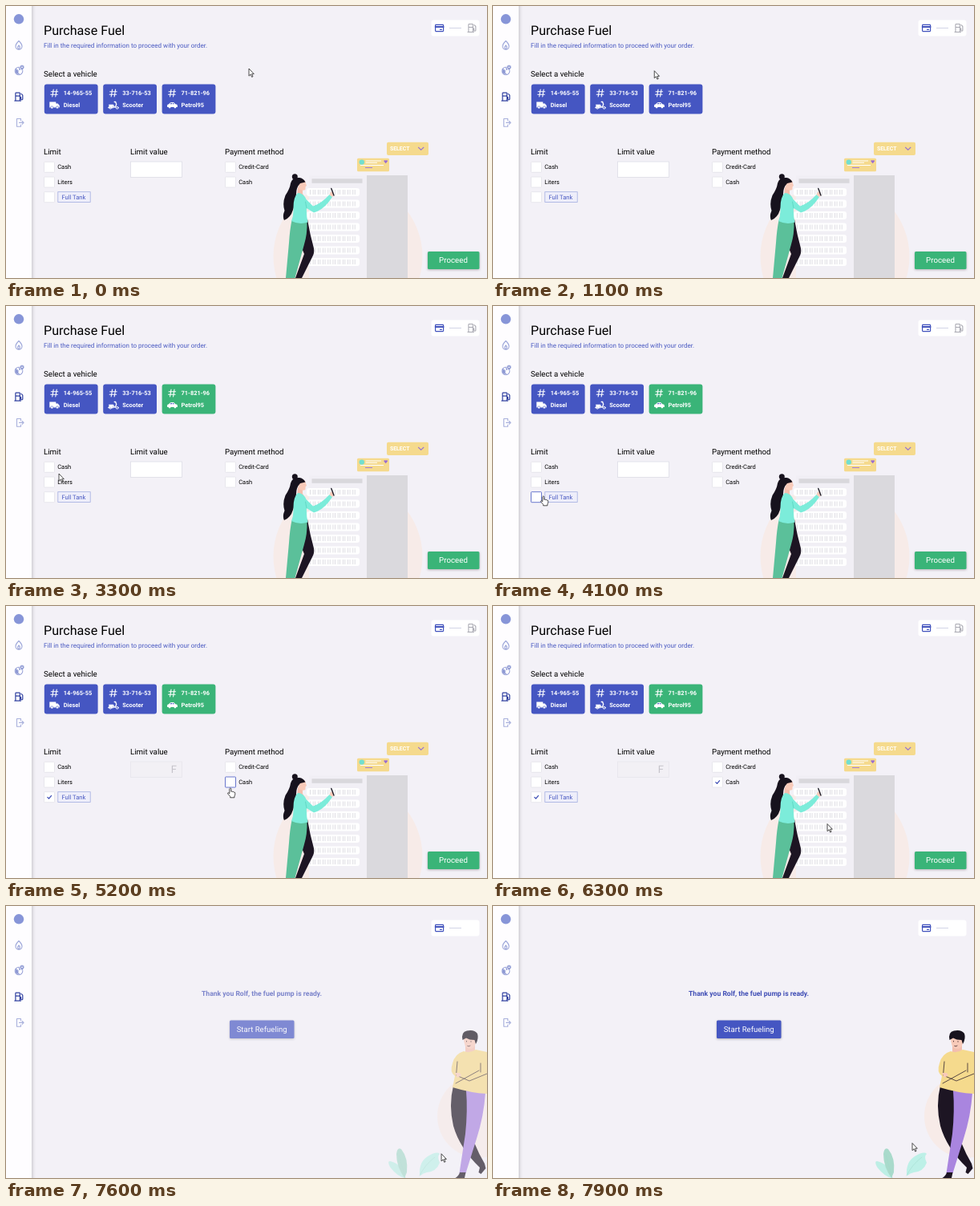
These frames come from a looping animation (600 by 339 pixels, 8 s). An HTML page:

```html
<!DOCTYPE html>
<html lang="en">
<head>
<meta charset="utf-8">
<title>Purchase Fuel</title>
<style>
  html, body { margin: 0; width: 100%; height: 100%; overflow: hidden; background: #f3f1f7; }
  svg { display: block; width: 100%; height: 100%; font-family: Roboto, sans-serif; text-rendering: geometricPrecision; }
  .head { font-size: 9.7px; fill: #000; }
  .label { font-size: 7.5px; fill: #000; }
  .plate { font-size: 7.4px; font-weight: 700; fill: #fff; }
  .line { fill: none; stroke-linecap: round; stroke-linejoin: round; }
  .soft { filter: drop-shadow(0 1px 1.5px #0004); }
</style>
</head>
<body>
<svg viewBox="0 0 600 339">
  <defs>
    <g id="pump" class="line">
      <path d="M1.5 10.5V1.2Q1.5.5 2.2.5H6.3Q7 .5 7 1.2V10.5M.5 10.5H8M1.5 4.5H7M7 6H8.2V8.5Q9.3 9.8 10.4 8.5V3.5L8.6 1.7"/>
    </g>
    <g id="hash" class="line" stroke="#fff" stroke-width="1.1">
      <path d="M3.4 0L2 9M7.4 0L6 9M.5 2.7H9M0 6.3H8.5"/>
    </g>
    <g id="truck">
      <path d="M0 0H8V2H10.3L12.5 4.5V7H0Z" fill="#fff"/>
      <g fill="#fff" stroke="#4556c2" stroke-width=".6"><circle cx="3" cy="7" r="1.6"/><circle cx="9.7" cy="7" r="1.6"/></g>
    </g>
    <g id="scooter" class="line" stroke="#fff">
      <path d="M1 4H6L7 6.5H8.7L10 3 9 0H7.5" stroke-width="1.3"/>
      <path d="M0 7Q1 4 4.5 4L6 7Z" fill="#fff"/>
      <circle cx="2.6" cy="7.3" r="1.4"/><circle cx="11" cy="7.3" r="1.4"/>
    </g>
    <g id="car">
      <path d="M0 6.4V4Q.5 3 2 2.8L4 .8Q5 .4 8 .6L10.2 2.8Q12.8 3 12.8 4.5V6.4Z" fill="#fff"/>
      <path d="M3.4 2.8L4.6 1.6H6V2.8ZM6.8 2.8V1.6H7.8L8.8 2.8Z" fill="#4556c2"/>
      <circle cx="3" cy="6.6" r="1.4" fill="#fff"/><circle cx="9.8" cy="6.6" r="1.4" fill="#fff"/>
    </g>
  </defs>

  <rect width="600" height="339" fill="#f3f1f7"/>

  <!-- Sidebar -->
  <rect x="-5" y="-5" width="37" height="349" fill="#fefdff" style="filter:drop-shadow(1px 0 2px #0003)"/>
  <circle cx="16" cy="16.3" r="6.2" fill="#8795d8"/>
  <g class="line" stroke="#9aa4d8" stroke-width="1.1">
    <path d="M16 43.5Q20 47.5 20 50.2A4 4 0 0 1 12 50.2Q12 47.5 16 43.5ZM16 49Q18 51 17 52.8Q16 54 15 52.8Q14 51 16 49Z"/>
    <circle cx="16" cy="81" r="4.8"/>
    <path d="M12.2 78.5L15 80.5 14.5 83 16.5 85M16 76.5L17.5 79"/>
    <path d="M18.5 140.5H13.5V150.3H18.5V148M18.5 140.5V142.8M16.5 145.4H22M20.2 143.5L22.1 145.4 20.2 147.3" stroke="#a9b1dc"/>
  </g>
  <path d="M12 79L15.5 81 14.5 85.3 12 83ZM16 77L18 79.5 16.5 80Z" fill="#8f9ad4"/>
  <path d="M20 80.5Q17.2 77.5 17.2 76.3A2.8 2.8 0 0 1 22.8 76.3Q22.8 77.5 20 80.5Z" fill="#8f9ad4" stroke="#fff" stroke-width=".5"/>
  <circle cx="20" cy="76.3" r=".9" fill="#fff"/>
  <use href="#pump" x="10.4" y="107.7" stroke="#3040a0" stroke-width="1.2"/>

  <!-- Progress -->
  <rect x="530.5" y="17.5" width="60" height="20" rx="3" fill="#fff"/>
  <g class="line" stroke="#4152bd" stroke-width="1.2">
    <rect x="535.6" y="23.4" width="10" height="8.2" rx=".8"/>
    <path d="M535.6 26H545.6" stroke-width="1.8"/><path d="M541.5 29.3H543.5"/>
  </g>
  <path d="M553 27.5H568" stroke="#c7cae0" stroke-width=".8"/>

  <!-- Order form -->
  <g id="form">
    <use href="#pump" x="575.5" y="22" stroke="#a9a9b2" stroke-width="1.1"/>
    <text x="47" y="36" font-size="16.1">Purchase Fuel</text>
    <text x="47" y="52.2" font-size="8.05" fill="#4a5ac2">Fill in the required information to proceed with your order.</text>
    <g class="head">
      <text x="47" y="87.5">Select a vehicle</text>
      <text x="47" y="184.5">Limit</text>
      <text x="155" y="184.5">Limit value</text>
      <text x="273" y="184.5">Payment method</text>
    </g>
    <g id="cards"></g>

    <!-- Server cabinet -->
    <circle cx="426.5" cy="312" r="93" fill="#f7ebe8"/>
    <rect x="378" y="211" width="72" height="128" fill="#f1eff5"/>
    <rect x="450" y="211" width="51" height="128" fill="#dad9dd"/>
    <rect x="381.5" y="215.3" width="63" height="5.5" fill="#d9d8dc"/>
    <g id="racks"></g>
    <rect x="475" y="169.7" width="52" height="16.3" rx="2" fill="#f5da8d"/>
    <text x="479" y="180.2" font-size="6.9" font-weight="700" fill="#fff">SELECT</text>
    <path class="line" d="M514.5 176.3L517.7 179.4 520.9 176.3" stroke="#9a78cf" stroke-width="1.2"/>
    <rect x="438" y="189.7" width="40" height="16.5" rx="1.5" fill="#f5da8d"/>
    <circle cx="443.8" cy="194.6" r="3.2" fill="#72dfcf"/>
    <path d="M448.5 193H468M448.5 195.3H463M442 198.5H471" stroke="#fff" stroke-width="1"/>
    <path d="M448 201.5H457" stroke="#a57ad0" stroke-width="1"/>
    <path d="M473.7 196.2L471.4 193.6Q471.2 191.4 473.7 192.6Q476.2 191.4 476 193.6Z" fill="#9a6bd0"/>

    <!-- Woman -->
    <path d="M364 268L376 266Q379 284 384 302Q385 308 382 313L369 339H361L372 309 364 290Z" fill="#1d1523"/>
    <path d="M356.5 267L375.5 269Q376 284 372 297L360.5 339H349L353 295Q354 279 356.5 267Z" fill="#5bc09a"/>
    <path d="M364 226H370V234L372 237 363 238Z" fill="#f3bfae"/>
    <path d="M364.5 217.5Q373 214 374 221L375 224 373.7 225 373.3 229Q370 231 365 228Z" fill="#f8cab9"/>
    <circle cx="360.3" cy="212.8" r="3.5" fill="#17121d"/>
    <path d="M373.5 219.5Q371 214.5 366 214Q357 213 355 221Q354 228 348.5 236Q344.5 246 347.5 255Q344.5 262 347 267Q355 264 358 254Q362 243 362 234Q362 226 367 221Z" fill="#17121d"/>
    <path d="M364 233Q371 233 374.5 241L383 249.5Q393 246.5 403.5 235L407 238Q397 254 384 257.5L375 252Q374.5 261 376.5 269.5Q366 273 356 268Q359 261 358.5 251Q358.5 238 364 233Z" fill="#7cecda"/>
    <path class="line" d="M373.5 244L375 252" stroke="#4fc9b8" stroke-width=".6"/>
    <path d="M403.5 235L405.5 231.5 408.5 232.5 409 236 407 238Z" fill="#f8cab9"/>
    <path class="line" d="M405.8 227.5L409 236" stroke="#1c1c28" stroke-width="1.4"/>

    <g id="boxes"></g>
    <g id="field">
      <rect x="155.5" y="194" width="64" height="19.5" stroke-width=".8"/>
      <text x="205.8" y="208.3" font-size="13" fill="#c5c3ca">F</text>
    </g>
    <rect x="64.8" y="231.7" width="40.4" height="12.8" fill="#eeeefa" stroke="#a4aee2" stroke-width=".8"/>
    <text x="69.4" y="240.8" font-size="7.6" fill="#4a5ac2">Full Tank</text>
    <g class="soft">
      <rect id="proceed" x="526" y="306" width="64.5" height="22" rx="1.5"/>
    </g>
    <text x="558" y="320.3" font-size="9.75" fill="#fff" text-anchor="middle">Proceed</text>
  </g>

  <!-- Confirmation -->
  <g id="done">
    <text x="319" y="111.7" font-size="8.6" font-weight="700" fill="#3f4db5" text-anchor="middle">Thank you Rolf, the fuel pump is ready.</text>
    <rect class="soft" x="279" y="142.5" width="80.5" height="22.5" rx="1.5" fill="#4556c2"/>
    <text x="319.2" y="157.2" font-size="9.6" fill="#fff" text-anchor="middle">Start Refueling</text>

    <circle cx="590" cy="262" r="52" fill="#f7ebe8"/>
    <path d="M498 339Q489 338 479.5 326Q475 318 479 318Q494 321 498 339Z" fill="#bdeee5"/>
    <path d="M497 339Q487 325 487 309Q488 300 493 303Q502 314 500 332Z" fill="#a9dacb"/>
    <path d="M516 335Q515 319 526 312Q538 305 541 309Q537 312 541 320Q537 331 525 332Q520 333 517 336Z" fill="#bdf0e7"/>
    <path class="line" d="M516 336Q522 323 535 313M498 339L490 310" stroke="#9fd8cb" stroke-width=".5"/>

    <!-- Man, legs crossed -->
    <path d="M558 224L580 229 577 270Q583 298 597 321L598.5 327 592.5 334 589.5 332 591 326Q566 302 558 274Q552 248 558 224Z" fill="#1d1523"/>
    <path d="M574 230L598 233Q596 262 587 290L573.5 333H565.5L573 284Q576 255 574 230Z" fill="#a985df"/>
    <path d="M566 332H573.5L572 339H560.5Q565 336 566 332Z" fill="#1d1523"/>
    <path d="M573 170H585V183L579 186 573 182Z" fill="#f3bfae"/>
    <path d="M571 164H586V171Q584 179 577 178Q571 176 571 164Z" fill="#f8cab9"/>
    <path d="M569.5 167Q567.5 157 575 155.5Q584 153.5 588 159Q590 165 586 172L584.5 167Q578 167 574 164.5Z" fill="#17121d"/>
    <path class="line" d="M574.5 168.3V169M580 168.6V169.3M575.8 174.5Q577.5 175.5 579 174.2" stroke="#3a2026" stroke-width=".8"/>
    <path d="M571 181Q578 184 586 179L600 182V234Q580 233 557 226L560 212Q553 207 557 196Q560 184 571 181Z" fill="#f5da8d"/>
    <path class="line" d="M563 194L561.5 211L578 218 600 209M561 221L590 205M592 196V207" stroke="#332531" stroke-width=".8"/>
    <path d="M560 208L566 208 568 211 563 214Z" fill="#f8cab9"/>
  </g>

  <g id="cursor" stroke="#222" stroke-width=".8" stroke-linejoin="round" fill="#fff">
    <path id="arrow" d="M0 0V9.2L2.1 7.2 3.6 10.5 5 9.9 3.6 6.7H6.3Z"/>
    <path id="hand" d="M-1.2.7Q-.2-1 .8.7V4.3Q2 3.3 2.7 4.6Q4 3.9 4.4 5.2Q5.9 4.8 5.8 6.5Q5.9 9 4.9 10V11.8H-.3V10.4L-3.4 6.9Q-3.7 5.5-2.2 5.8L-1.2 6.8Z"/>
  </g>
</svg>
<script>
const $ = id => document.getElementById(id);
const BLUE = '#4556c2', GREEN = '#3ab478', BORDER = '#e2e1e9';
const LOOP = 8000, SUBMIT = 7400;

const cards = [
  { x: 47.8, plate: '14-965-55', fuel: 'Diesel', icon: 'truck' },
  { x: 121.2, plate: '33-716-53', fuel: 'Scooter', icon: 'scooter' },
  { x: 194.6, plate: '71-821-96', fuel: 'Petrol95', icon: 'car', at: 2600 },
];
const boxes = [
  { x: 47.5, y: 194.3, label: 'Cash' },
  { x: 47.5, y: 213, label: 'Liters' },
  { x: 47.5, y: 231.7, label: '', at: 4500 },
  { x: 273.5, y: 194.3, label: 'Credit-Card' },
  { x: 273.5, y: 213, label: 'Cash', at: 5500 },
];
// Cursor stops: time, x, y
const path = [
  [0, 303, 78], [200, 303, 78], [1900, 116, 83], [2400, 226, 114], [2900, 226, 114],
  [3300, 66, 209], [3700, 63, 237], [4700, 63, 237], [5200, 280, 227], [5800, 280, 227],
  [6800, 554, 316], [7400, 554, 316], [7900, 523, 295.5], [8000, 523, 295.5],
];

$('cards').innerHTML = cards.map(c => `<g transform="translate(${c.x} 97.5)">
  <rect width="66.8" height="37" rx="3"/>
  <use href="#hash" x="8" y="6.5"/><use href="#${c.icon}" x="6.5" y="22"/>
  <text class="plate" x="24" y="13.8">${c.plate}</text>
  <text class="plate" x="24" y="28.6">${c.fuel}</text></g>`).join('');

$('boxes').innerHTML = boxes.map(b => `<g transform="translate(${b.x} ${b.y})">
  <rect width="13" height="13" rx=".8" fill="#fff" stroke-width=".8"/>
  <path class="line" d="M4.3 6.6L6 8.3 9.1 4.7" stroke="#3d4db5" stroke-width="1.2"/>
  <text class="label" x="16.7" y="9.1">${b.label}</text></g>`).join('');

$('racks').innerHTML = Array.from({ length: 7 }, (_, i) => {
  const y = 227 + i * 14.5;
  return `<rect x="375" y="${y}" width="66" height="10" rx="3" fill="#fff"/>
    <path d="M379 ${y + 5}H438" stroke="#d6d5dc" stroke-width="6" stroke-dasharray=".8 3 .8 1.6"/>`;
}).join('');

const cardRects = $('cards').querySelectorAll('rect');
const boxRects = $('boxes').querySelectorAll('rect');
const ticks = $('boxes').querySelectorAll('path');
const [fieldRect, fieldText] = $('field').children;

const show = (el, on) => el.setAttribute('visibility', on ? 'visible' : 'hidden');
const clamp = v => Math.max(0, Math.min(1, v));
const ease = v => v * v * (3 - 2 * v);

function cursorAt(t) {
  const i = Math.max(1, path.findIndex(p => p[0] > t));
  const [t0, x0, y0] = path[i - 1], [t1, x1, y1] = path[i];
  const k = ease((t - t0) / (t1 - t0));
  return [x0 + (x1 - x0) * k, y0 + (y1 - y0) * k];
}

function draw(t) {
  const [x, y] = cursorAt(t);
  const over = (left, top, w, h) => x >= left && x <= left + w && y >= top && y <= top + h;
  const open = t < SUBMIT;
  const clicked = item => t >= item.at;
  let pointing = false;

  cards.forEach((c, i) => {
    pointing ||= over(c.x, 97.5, 66.8, 37);
    cardRects[i].setAttribute('fill', clicked(c) ? GREEN : BLUE);
  });
  boxes.forEach((b, i) => {
    const hover = over(b.x - 1, b.y - 1, 17, 16);
    pointing ||= hover;
    boxRects[i].setAttribute('stroke', hover ? BLUE : BORDER);
    show(ticks[i], clicked(b));
  });
  const onProceed = over(526, 306, 64.5, 22);
  pointing ||= onProceed;
  $('proceed').setAttribute('fill', onProceed ? '#4cbb84' : GREEN);

  const locked = clicked(boxes[2]);
  fieldRect.setAttribute('fill', locked ? '#f2f0f5' : '#fff');
  fieldRect.setAttribute('stroke', locked ? '#e7e5ec' : '#dddce5');
  show(fieldText, locked);

  $('form').setAttribute('opacity', open ? 1 : clamp(1 - (t - SUBMIT + 100) / 200));
  $('done').setAttribute('opacity', clamp((t - SUBMIT) / 300));
  $('cursor').setAttribute('transform', `translate(${x} ${y})`);
  show($('hand'), pointing && open);
  show($('arrow'), !(pointing && open));
}

const start = performance.now();
function tick() {
  const t = (performance.now() - start) % LOOP;
  draw(Math.floor(t / 100) * 100);
  requestAnimationFrame(tick);
}
tick();
</script>
</body>
</html>
```
